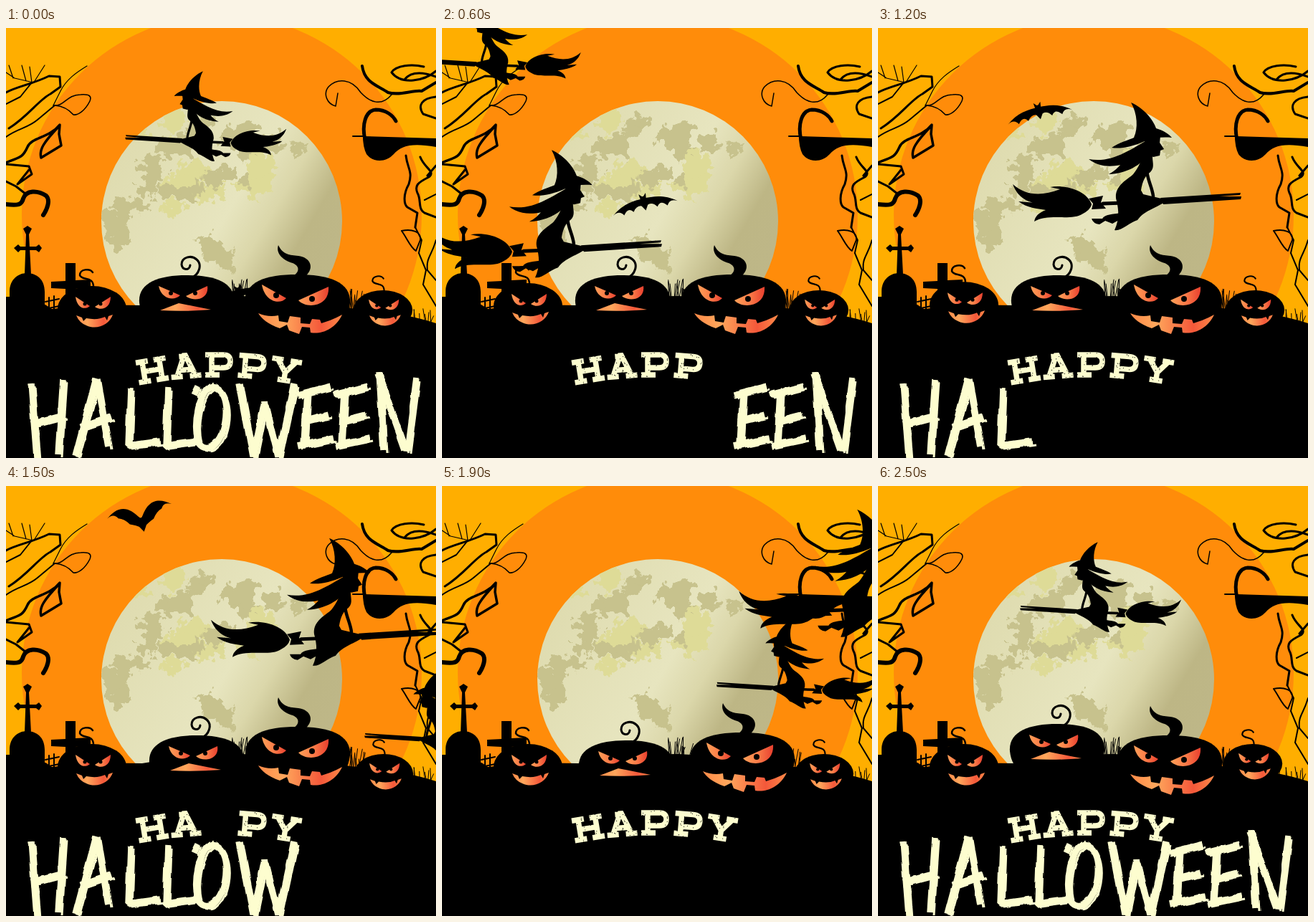
Animation, 600 px wide and 600 px high, one loop 2600 ms. Source, as an HTML page:

```html
<!DOCTYPE html>
<html lang="en">
<head>
<meta charset="utf-8">
<title>Happy Halloween</title>
<style>
html, body { margin: 0; width: 100%; height: 100%; overflow: hidden; background: #000; }
svg { display: block; width: 100vw; height: 100vh; }
.line { fill: none; stroke: #000; stroke-linecap: round; stroke-linejoin: round; }
.ink { fill: none; stroke: #fdfdcf; }
</style>
</head>
<body>
<svg viewBox="0 0 600 600" role="img" aria-label="Happy Halloween">
<defs>
  <linearGradient id="moonFill" gradientUnits="userSpaceOnUse" x1="160" y1="180" x2="450" y2="350">
    <stop offset="0" stop-color="#dfdcb0"/><stop offset=".5" stop-color="#e7e5bf"/>
    <stop offset=".66" stop-color="#dbd7aa"/><stop offset=".82" stop-color="#bdb685"/><stop offset="1" stop-color="#beb788"/>
  </linearGradient>
  <linearGradient id="glow">
    <stop offset="0" stop-color="#ff8a48"/><stop offset=".3" stop-color="#ffa75c"/>
    <stop offset=".75" stop-color="#f4583a"/><stop offset="1" stop-color="#ff8a48"/>
  </linearGradient>
  <linearGradient id="eye"><stop offset="0" stop-color="#ffa058"/><stop offset=".5" stop-color="#fb7c48"/><stop offset="1" stop-color="#e8402f"/></linearGradient>
  <filter id="jag" x="-5%" y="-5%" width="110%" height="110%" color-interpolation-filters="sRGB">
    <feTurbulence type="fractalNoise" baseFrequency=".08" numOctaves="3" seed="4"/>
    <feDisplacementMap in="SourceGraphic" scale="28" xChannelSelector="R" yChannelSelector="G"/>
  </filter>
  <filter id="rough" filterUnits="userSpaceOnUse" x="0" y="470" width="600" height="130" color-interpolation-filters="sRGB">
    <feTurbulence type="fractalNoise" baseFrequency=".06 .03" numOctaves="2" seed="7"/>
    <feDisplacementMap in="SourceGraphic" scale="5" xChannelSelector="R" yChannelSelector="G"/>
  </filter>
  <clipPath id="moonClip"><circle cx="301" cy="270" r="168"/></clipPath>
  <g id="witch">
    <path class="line" stroke-width="5" d="M318 243L402 240"/>
    <path d="M398 235L510 228L509 231L480 233L511 233L510 237L402 244Z"/>
    <path d="M302 244C296 226 268 216 244 220L258 223C232 233 210 232 192 216C200 238 218 244 238 243L200 240C212 249 226 250 238 252C228 256 223 261 222 268C242 256 274 268 290 257Q300 252 302 244Z"/>
    <path d="M298 236L318 232L315 241L322 250L302 251L304 243Z"/>
    <path d="M357 102C375 110 388 126 392 138C402 141 410 146 414 151C400 150 388 151 376 156C358 164 342 167 330 165C340 158 354 154 361 151C367 138 366 118 357 102Z"/>
    <path d="M376 150L398 148L397 158L403 167L398 169L397 176L388 178L376 172Z"/>
    <path d="M384 152C355 168 330 187 298 181C312 192 328 192 342 189C336 196 331 199 326 202C350 201 372 190 382 172Z"/>
    <path d="M375 170L387 174C386 184 391 192 384 199C374 206 372 216 370 230L338 232C336 216 352 210 360 202C368 192 372 182 375 170Z"/>
    <path class="line" stroke-width="4.500" d="M380 184C376 206 386 216 388 233"/>
    <path d="M336 236C334 219 350 208 364 212L374 230L408 238C392 250 376 252 366 266C355 269 343 282 334 280C341 265 340 250 336 236Z"/>
    <path d="M342 256C332 258 320 258 317 264L302 264Q304 271 313 272L321 267L331 271L340 266Z"/>
  </g>
  <g id="imp">
    <ellipse cx="120" cy="392" rx="48" ry="32"/>
    <path class="line" stroke-width="2.500" d="M122 361C122 346 106 353 103 345C103 336 117 335 121 341"/>
    <path fill="url(#eye)" d="M97 375L117 388C110 394 99 391 97 375Z"/>
    <path fill="url(#eye)" d="M146 375L124 389C132 395 146 392 146 375Z"/>
    <circle cx="110" cy="385" r="2.500"/><circle cx="132" cy="385" r="2.500"/>
    <path fill="url(#glow)" d="M98 401L106 404L108 409L112 405Q128 408 138 403L141 408L143 402L149 400C144 414 127 422 112 415Q102 411 98 401Z"/>
  </g>
</defs>

<rect width="600" height="600" fill="#ffae00"/>
<circle cx="301" cy="261" r="279" fill="#ff8c0a"/>
<circle cx="301" cy="270" r="168" fill="url(#moonFill)"/>
<g clip-path="url(#moonClip)"><g id="stains" filter="url(#jag)"></g></g>

<g id="bat"><path id="wings"/><path d="M-4 -4L-5 -12L-1 -8L1 -8L5 -12L4 -4L5 4L0 12L-5 4Z"/></g>

<g class="line" stroke-width="2">
  <path stroke-width="1.200" d="M113 53C98 62 84 72 76 88L66 108M10 70L4 52M28 74L22 52M36 76L33 54M40 74L54 52M0 62L12 70L38 76"/>
  <path stroke-width="1.600" d="M66 108C82 110 84 93 104 93C116 92 120 95 117 102C110 116 100 122 94 121C88 114 80 109 68 108"/>
  <path stroke-width="3" d="M0 90C14 82 38 78 60 67L75 68L76 82L62 92C46 100 30 124 4 140"/>
  <path d="M0 106L20 96L36 76M0 152C16 140 30 140 44 128L68 108"/>
  <path stroke-width="3.500" d="M0 188C16 180 22 184 30 166C36 152 60 154 75 135L74 148L77 164L49 181C46 170 52 160 74 137"/>
  <path stroke-width="3" d="M0 190L32 193L36 204L16 218L24 208L32 198M0 214L14 221L28 232"/>
  <path stroke-width="6" d="M0 246C16 248 22 247 24 238C28 226 44 226 56 234C62 240 58 252 52 261"/>
  <path stroke-width="1.500" d="M538 93C524 110 508 104 495 90C482 70 462 70 450 82C442 92 448 106 460 109L463 91"/>
  <path stroke-width="4" d="M497 53C500 76 518 80 533 90C550 95 568 86 580 88L600 76"/>
  <path stroke-width="3" d="M600 60C584 74 552 80 538 62C544 52 566 50 583 54M556 72C564 62 578 60 600 68M600 96C580 98 574 108 582 120L600 126"/>
  <path d="M484 151H500"/>
  <path stroke-width="5" d="M501 156C496 134 502 115 516 114C530 114 540 122 544 130"/>
  <path stroke-width="3" d="M558 178C560 196 568 200 562 218C554 232 555 246 560 250L574 258L571 278M578 180C584 196 600 200 590 208C574 216 570 220 574 230C580 240 574 252 584 258L600 264M600 192L588 206"/>
  <path d="M552 283C566 280 580 284 578 296L572 311C564 306 560 294 552 283M571 278L580 296L576 314L586 338L582 358L600 388M600 296C594 318 586 320 588 338L600 352M600 232L584 240"/>
</g>
<path d="M498 151L600 154V166C566 160 552 164 541 176C530 188 512 188 503 176Q498 166 498 151Z"/>

<path d="M5 400V368C5 350 18 342 29 342C42 342 54 350 54 368V400ZM26 344L28 288L24 280L30 276L36 280L32 288L35 344ZM11 307L17 302L20 305H42L46 302L50 307L46 313L42 310H20L17 313ZM83 328H97V352L118 351V362L97 364V395H83V364L63 363V354L83 353Z"/>
<path class="line" stroke-width="2" d="M55 382L74 378M55 392L74 388M60 376V402M67 374V400"/>
<path class="line" id="grass" stroke-width="1"/>
<path d="M0 375Q40 374 64 392Q120 386 190 387Q260 374 330 374Q420 378 480 391Q550 396 600 412V600H0Z"/>

<g id="p1"><use href="#imp"/></g>
<g id="p2">
  <path d="M186 383C184 356 212 345 252 345C294 345 320 356 318 383Q312 424 250 426Q190 424 186 383Z"/>
  <path class="line" stroke-width="3" d="M258 349C270 344 274 330 266 323C258 316 245 320 245 330C246 338 256 339 257 331"/>
  <path fill="url(#eye)" d="M213 360L243 373C235 381 217 379 213 360Z"/>
  <path fill="url(#eye)" d="M281 360L251 374C261 383 284 379 281 360Z"/>
  <circle cx="230" cy="370" r="3"/><circle cx="264" cy="370" r="3"/>
  <path fill="url(#glow)" d="M215 394L241 384L286 393Q250 396 215 394Z"/>
</g>
<g id="p3">
  <path d="M334 384C332 354 362 344 406 344C450 344 482 354 480 384Q474 432 410 432Q340 430 334 384Z"/>
  <path d="M392 350C410 344 412 333 400 328C386 324 376 314 380 303C386 316 396 317 408 318C424 320 428 332 423 340L416 350Z"/>
  <path fill="url(#eye)" d="M357 358L391 377C382 387 361 382 357 358Z"/>
  <path fill="url(#eye)" d="M450 361L408 380C418 392 452 390 450 361Z"/>
  <circle cx="377" cy="373" r="4"/><circle cx="427" cy="378" r="4"/>
  <path fill="url(#glow)" d="M352 398Q366 404 380 401L381 409L393 411L396 402L411 404L411 412L424 413L427 406L438 407L440 412L452 408Q462 404 469 400C460 420 440 428 425 425L424 418L413 417L409 427L395 422L392 414L382 419C365 413 357 406 352 398Z"/>
</g>
<g id="p4"><use href="#imp" transform="translate(422.700 56.300) scale(.86)"/></g>

<g id="happy" class="ink" stroke-width="7.500"></g>
<path id="specks" class="line" stroke-width="1.100"/>
<g id="title" class="ink" filter="url(#rough)" stroke-linejoin="bevel"></g>

<use id="big" href="#witch"/>
<use id="small" href="#witch"/>
</svg>
<script>
const LOOP = 2600, STEP = 100, TAU = Math.PI * 2;
const $ = id => document.getElementById(id);
const add = (parent, tag, attrs) => {
  const el = document.createElementNS("http://www.w3.org/2000/svg", tag);
  for (const k in attrs) el.setAttribute(k, attrs[k]);
  return parent.appendChild(el);
};
let seed = 11;
const rnd = () => (seed = seed * 16807 % 2147483647) / 2147483647;
const around = (v, spread) => v + (rnd() - .5) * spread;

// Ragged blobs scattered along a line across the moon
function stain(d, count, size, fill) {
  const trail = add($("stains"), "path", { d, fill: "none" });
  const length = trail.getTotalLength();
  for (let n = 0; n < count; n++) {
    const p = trail.getPointAtLength(length * (n + .5) / count);
    const x = around(p.x, 26), y = around(p.y, 26), r = size * (.6 + rnd() * .6);
    let points = "";
    for (let i = 0; i < 12; i++) {
      const k = r * (.6 + rnd() * .6), q = i * TAU / 12;
      points += `${x + Math.cos(q) * k * 1.15},${y + Math.sin(q) * k} `;
    }
    add($("stains"), "polygon", { points, fill });
  }
}
const OLIVE = "#c7c28d", YELLOW = "#dedb97";
stain("M190 150L245 130M215 215L270 195L240 245L330 215L375 185", 14, 17, YELLOW);
stain("M150 275L205 215L220 170L290 140L345 160L415 172", 17, 17, OLIVE);
stain("M205 215L260 232L325 200M275 285L310 335M160 300L175 310", 11, 15, OLIVE);

let blades = "";
const grow = (x0, x1, y, h, n) => {
  for (let i = 0; i < n; i++)
    blades += `M${x0 + rnd() * (x1 - x0)} ${y}l${around(1, 10)} ${-h * (.4 + rnd() * .6)}`;
};
grow(312, 346, 378, 32, 14);
grow(478, 500, 397, 36, 12);
grow(556, 600, 412, 24, 10);
$("grass").setAttribute("d", blades);

// Slab letters on an arch
const slab = {
  H: "M-12 -14V14M12 -14V14M-12 0H12M-21 -14H-4M4 -14H21M-21 14H-4M4 14H21",
  A: "M-13 14L-1 -15H1L13 14M-8 5H8M-21 14H-5M5 14H21M-8 -14H1",
  P: "M-10 -14V14M-19 -14H6Q16 -14 16 -5Q16 4 6 4H-10M-19 14H1",
  Y: "M-13 -14L0 3L13 -14M0 2V14M-21 -14H-5M5 -14H21M-9 14H9"
};
const happy = [..."HAPPY"].map((c, i) => {
  const k = i - 2;
  return add($("happy"), "path", {
    d: slab[c], transform: `translate(${297 + k * 46.5} ${470 + k * k * 1.9}) rotate(${k * 4.7})`
  });
});
let specks = "";
for (let i = 0; i < 230; i++) specks += `M${182 + rnd() * 230} ${452 + rnd() * 46}h.1`;
$("specks").setAttribute("d", specks);

// Brush letters, each with a thin scratch beside it
const brush = {
  H: "M35 496L43 600M80 490L73 595M35 553L80 541",
  A: "M126 489L97 598M127 490L143 584M103 558L147 543",
  L: "M174 502L171 583L215 577",
  O: "M290 499C268 508 262 550 268 576C276 594 292 588 302 566C312 536 308 502 286 501M262 512L268 500",
  W: "M326 497L345 599L361 522L380 599L402 496",
  E: "M420 508L416 581M406 512L453 500M414 549L450 540M408 583L456 573",
  N: "M521 480L527 588M519 482L557 588M573 488L560 590"
};
const title = [..."HALLOWEEN"].map((c, i, all) => {
  const shift = c === all[i - 1] ? 52 : 0;
  const g = add($("title"), "g", { transform: `translate(${shift} 0)` });
  add(g, "path", { d: brush[c], "stroke-width": 9.5 });
  add(g, "path", { d: brush[c], "stroke-width": 3, transform: "translate(5 4)" });
  return g;
});

const show = (el, on) => el.setAttribute("visibility", on ? "visible" : "hidden");
const place = (id, value) => $(id).setAttribute("transform", value);

// Pumpkin offsets at shared times
const beats = [1200, 1500, 1900, 2500, LOOP];
const hops = {
  p2: [[0, 0], [14, 3], [5, 10], [-2, -13], [0, 0]],
  p3: [[0, 0], [0, -8], [12, 0], [0, 4], [0, 0]],
  p4: [[0, 0], [1, 8], [7, 8], [-3, -6], [0, 0]]
};
function hop(points, t) {
  const i = Math.max(1, beats.findIndex(b => t < b));
  const k = Math.max(0, (t - beats[i - 1]) / (beats[i] - beats[i - 1]));
  return points[i].map((v, n) => points[i - 1][n] * (1 - k) + v * k);
}

const wing = (s, y) => `M0 -5C${s * 14} ${y - 14} ${s * 30} ${y - 13} ${s * 46} ${y}` +
  `Q${s * 36} ${y - 6} ${s * 31} ${y + 3}Q${s * 23} ${y / 2 - 3} ${s * 17} ${y / 2 + 6}Q${s * 10} 0 0 7Z`;

// Letters vanish from the left, return one by one, then blink
function titleRange(n) {
  if (n < 9) return [n, 9];
  if (n <= 18) return [0, n - 9];
  return [0, n >= 24 || n % 2 === 0 ? 9 : 0];
}

function draw(t) {
  const n = t / STEP;
  for (const id in hops) place(id, `translate(${hop(hops[id], t)})`);
  const jump = Math.min(1, Math.max(0, (t - 500) / 850));
  place("p1", `translate(0 ${-11 * Math.sin(jump * Math.PI)})`);

  place("big", `translate(${100 + .348 * t - 8e-6 * t * t - 510} ${371 - .122 * t + 6.5e-6 * t * t - 232})`);
  show($("big"), n >= 1 && n < 25);
  const s = t < LOOP / 2 ? t : t - LOOP;
  place("small", `translate(${167 - .32 * s - 1.5e-5 * s * s} ${152 - .178 * s}) scale(-.705 .705) translate(-510 -232)`);

  place("bat", `translate(${325 - .06 * t - 2e-5 * t * t} ${370 - .212 * t}) rotate(-13)`);
  const tip = n % 2 ? -17 : 9;
  $("wings").setAttribute("d", wing(-1, tip) + wing(1, tip));

  const gap = (n - 2) % 11;
  happy.forEach((el, i) => show(el, n >= 24 || i !== gap));
  const [from, to] = titleRange(n);
  title.forEach((el, i) => show(el, i >= from && i < to));
}

let last = -1;
function tick() {
  const t = Math.floor(performance.now() % LOOP / STEP) * STEP;
  if (t !== last) draw(last = t);
  requestAnimationFrame(tick);
}
tick();
</script>
</body>
</html>
```
